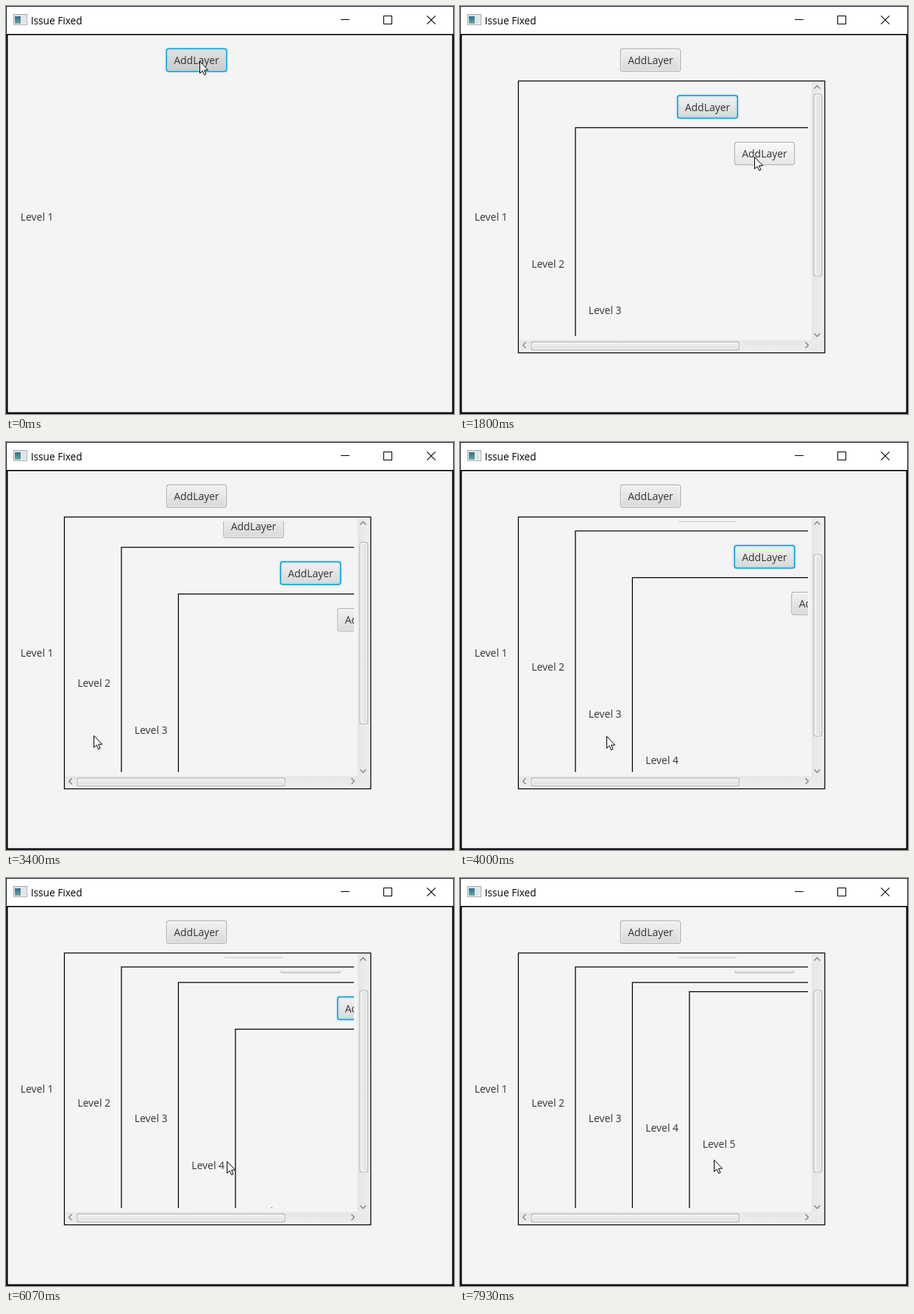
Animation, 609 px wide and 555 px high, one loop 8 s. Source, as an HTML page:

```html
<!DOCTYPE html>
<html lang="en">
<head>
<meta charset="utf-8">
<title>Nested layers</title>
<style>
html, body { margin: 0; width: 100%; height: 100%; overflow: hidden; background: #20242a; }
svg { display: block; width: 609px; height: 555px; }
text { font-family: "Open Sans", "Noto Sans", sans-serif; font-size: 14px; fill: #333; }
</style>
</head>
<body>
<svg id="stage" viewBox="0 0 609 555">
  <defs id="defs"></defs>
  <rect width="609" height="555" fill="#20242a"/>
  <rect x="1" y="1" width="607" height="37.5" fill="#fff"/>
  <g id="icon">
    <rect x="10.5" y="11.5" width="18" height="14" fill="#f3f5f6" stroke="#a3a8ac"/>
    <rect x="11" y="12" width="17" height="2" fill="#dfe4e8"/>
    <rect x="12" y="14" width="8" height="10" fill="url(#teal)"/>
    <rect x="21" y="14" width="6" height="10" fill="#e1e4e6"/>
  </g>
  <text x="33.8" y="25" style="font-size:13.65px;fill:#000">Issue Fixed</text>
  <g fill="none" stroke="#000">
    <path d="M455 18.5H467"/>
    <rect x="513.5" y="13.5" width="11" height="11"/>
    <path d="M572.3 13.3L583.7 24.7M583.7 13.3L572.3 24.7" stroke-width="1.1"/>
  </g>
  <rect x="1" y="38" width="607" height="516" fill="#000"/>
  <rect x="2.5" y="39.6" width="604" height="513" fill="#f4f4f4"/>
  <g id="window"></g>
  <path id="cursor" d="M.5 .5V16.6L4.2 13.2L6.6 18.8L9 17.8L6.6 12.2H11.6Z" fill="#fff" stroke="#000"/>
</svg>
<script>
const STEP = 8000 / 120;          // the picture advances 15 times a second
const DX = 77.5, DY = 63.5;       // offset between nested layers
const LAYERS = 5;
const $ = id => document.getElementById(id);

function el(parent, tag, attrs = {}, text) {
  const node = document.createElementNS("http://www.w3.org/2000/svg", tag);
  for (const key in attrs) node.setAttribute(key, attrs[key]);
  if (text) node.textContent = text;
  parent.append(node);
  return node;
}

function gradient(id, from, to, across) {
  const g = el($("defs"), "linearGradient", { id, x1: 0, y1: 0, x2: across ? 1 : 0, y2: across ? 0 : 1 });
  el(g, "stop", { offset: 0, "stop-color": from });
  el(g, "stop", { offset: 1, "stop-color": to });
}
gradient("teal", "#356a8c", "#5fae9c");
gradient("normal", "#f0f0f0", "#dadada");
gradient("hover", "#f8f8f8", "#e7e7e7");
gradient("pressed", "#e0e0e0", "#cdcdcd");
gradient("rim", "#fcfcfc", "#ebebeb");
gradient("thumbV", "#f3f3f3", "#dcdcdc", true);
gradient("thumbH", "#f3f3f3", "#dcdcdc");
gradient("trackV", "#e6e6e6", "#eeeeee", true);
gradient("trackH", "#e6e6e6", "#eeeeee");

function box(parent, x, y, w, h, inset, r, fill) {
  return el(parent, "rect", {
    x: x + inset, y: y + inset, width: w - 2 * inset, height: h - 2 * inset, rx: r, fill
  });
}

function makeButton(parent, x, y) {
  const w = 82.5, h = 31.75;
  const plain = el(parent, "g"), ring = el(parent, "g");
  box(plain, x, y, w, h, 0, 3.75, "#b4b4b4");
  box(plain, x, y, w, h, 1.25, 2.5, "url(#rim)");
  const bodies = [box(plain, x, y, w, h, 2.5, 1.25)];
  box(ring, x, y, w, h, -.25, 3.75, "#039ed3");
  box(ring, x, y, w, h, 1.25, 2.5, "url(#rim)");
  bodies.push(box(ring, x, y, w, h, 2.5, 1.25));
  box(ring, x, y, w, h, -1.75, 5, "#039ed322");
  bodies.push(box(ring, x, y, w, h, 3.25, 1.25));
  el(parent, "text", { x: x + w / 2, y: y + 21.25, "text-anchor": "middle" }, "AddLayer");
  return { x, y, w, h, plain, ring, bodies };
}

function makeBars(parent) {
  el(parent, "rect", { x: 478, y: 103.5, width: 17, height: 351, fill: "url(#trackV)" });
  el(parent, "rect", { x: 80.5, y: 454.5, width: 397.5, height: 16, fill: "url(#trackH)" });
  el(parent, "rect", { x: 478, y: 454.5, width: 17, height: 16, fill: "#eaeaea" });
  const thumb = (x, y, width, height, fill) => {
    const g = el(parent, "g");
    el(g, "rect", { x, y, width, height, rx: 2.5, fill, stroke: "#b4b4b4", "stroke-width": 1.2 });
    el(g, "rect", { x: x + 1.2, y: y + 1.2, width: width - 2.4, height: height - 2.4, rx: 1.5,
      fill: "none", stroke: "#fafafa", "stroke-width": 1 });
    return g;
  };
  thumb(97, 457.2, 282, 10.6, "url(#thumbH)");
  el(parent, "path", {
    d: "M481.5 112.5l4-4l4 4M481.5 445.5l4 4l4-4M89.5 457.5l-4 4l4 4M469.5 457.5l4 4l-4 4",
    fill: "none", stroke: "#808080", "stroke-width": 1.3
  });
  return thumb(481.1, 120, 10.6, 247, "url(#thumbV)");
}

const layers = [];
let thumb;

function makeLayer(n, parent) {
  const x = 1.25 + DX * n, y = 37.9 + DY * n;
  const root = el(parent, "g");
  if (n > 0) {
    const w = n === 1 ? 417.75 : 600, h = n === 1 ? 371 : 600;
    el(root, "rect", { x: x + .62, y: y + .62, width: w - 1.25, height: h - 1.25,
      fill: "#f4f4f4", stroke: "#000", "stroke-width": 1.25 });
  }
  if (n === 1) thumb = makeBars(root);
  const view = el(root, "g");
  if (n > 0) {
    const clip = el($("defs"), "clipPath", { id: "clip" + n });
    const left = x + 1.25, top = y + 6.3;
    el(clip, "rect", { x: left, y: top,
      width: n === 1 ? 473 - left : 600, height: n === 1 ? 449 - top : 600 });
    view.setAttribute("clip-path", `url(#clip${n})`);
  }
  const content = el(view, "g");
  el(content, "text", { x: 19.7 + DX * n, y: 292 + DY * n }, "Level " + (n + 1));
  const button = makeButton(content, 217.75 + DX * n, 57.75 + DY * n);
  layers.push({ root, content, button });
  if (n + 1 < LAYERS) makeLayer(n + 1, content);
}
makeLayer(0, $("window"));

// Times below count steps of the clock.
const shownAt = [0, 1, 18, 33, 88];
const focusAt = [0, 14, 30, 85];
const presses = [[0, 1], [14, 18], [30, 33], [85, 88]];
const scrolls = [null, [47, 55, 44.5], [63, 71, 42.4], [95, 102, 51], [111, 119, 41.6]];
const moves = [
  [0, 263, 75], [3, 263, 75], [11, 352, 146], [18, 352, 146], [27, 400, 205],
  [36, 400, 205], [42, 62, 330], [43, 50, 360], [45, 119, 399],
  [57, 119, 399], [59, 172, 395], [60, 199, 400],
  [73, 199, 400], [74, 415, 244], [81, 470, 178], [87, 470, 178],
  [91, 300, 385], [106, 300, 385], [107, 345, 383], [120, 345, 383]
];

const clamp = v => Math.max(0, Math.min(1, v));
const smooth = v => v * v * (3 - 2 * v);
const show = (node, on) => node.setAttribute("display", on ? "inline" : "none");
const shift = (node, x, y) => node.setAttribute("transform", `translate(${x} ${y})`);

function cursorAt(k) {
  const i = moves.findIndex((m, j) => j > 0 && k <= m[0]);
  const [k0, x0, y0] = moves[i - 1], [k1, x1, y1] = moves[i];
  const p = smooth((k - k0) / (k1 - k0));
  return [Math.round(x0 + (x1 - x0) * p), Math.round(y0 + (y1 - y0) * p)];
}

function draw(t) {
  const k = Math.floor((t + 4) / STEP) % 120;
  const [cx, cy] = cursorAt(k);
  const focus = focusAt.filter(start => k >= start).length - 1;
  shift($("cursor"), cx, cy);

  let offset = 0;
  layers.forEach(({ root, content, button }, n) => {
    show(root, k >= shownAt[n]);
    if (scrolls[n]) {
      const [from, to, amount] = scrolls[n];
      const p = clamp((k - from) / (to - from));
      offset += amount * p;
      shift(content, 0, -amount * p);
      if (n === 1) shift(thumb, 0, 33 * p);
    }
    const bx = cx - button.x, by = cy - button.y + offset;
    const over = bx >= 0 && bx < button.w && by >= 0 && by < button.h;
    const down = presses[n] && k >= presses[n][0] && k < presses[n][1];
    const fill = `url(#${down ? "pressed" : over ? "hover" : "normal"})`;
    button.bodies.forEach(b => b.setAttribute("fill", fill));
    show(button.ring, n === focus);
    show(button.plain, n !== focus);
  });
}

const start = performance.now();
function tick() {
  draw((performance.now() - start) % 8000);
  requestAnimationFrame(tick);
}
tick();
</script>
</body>
</html>
```
